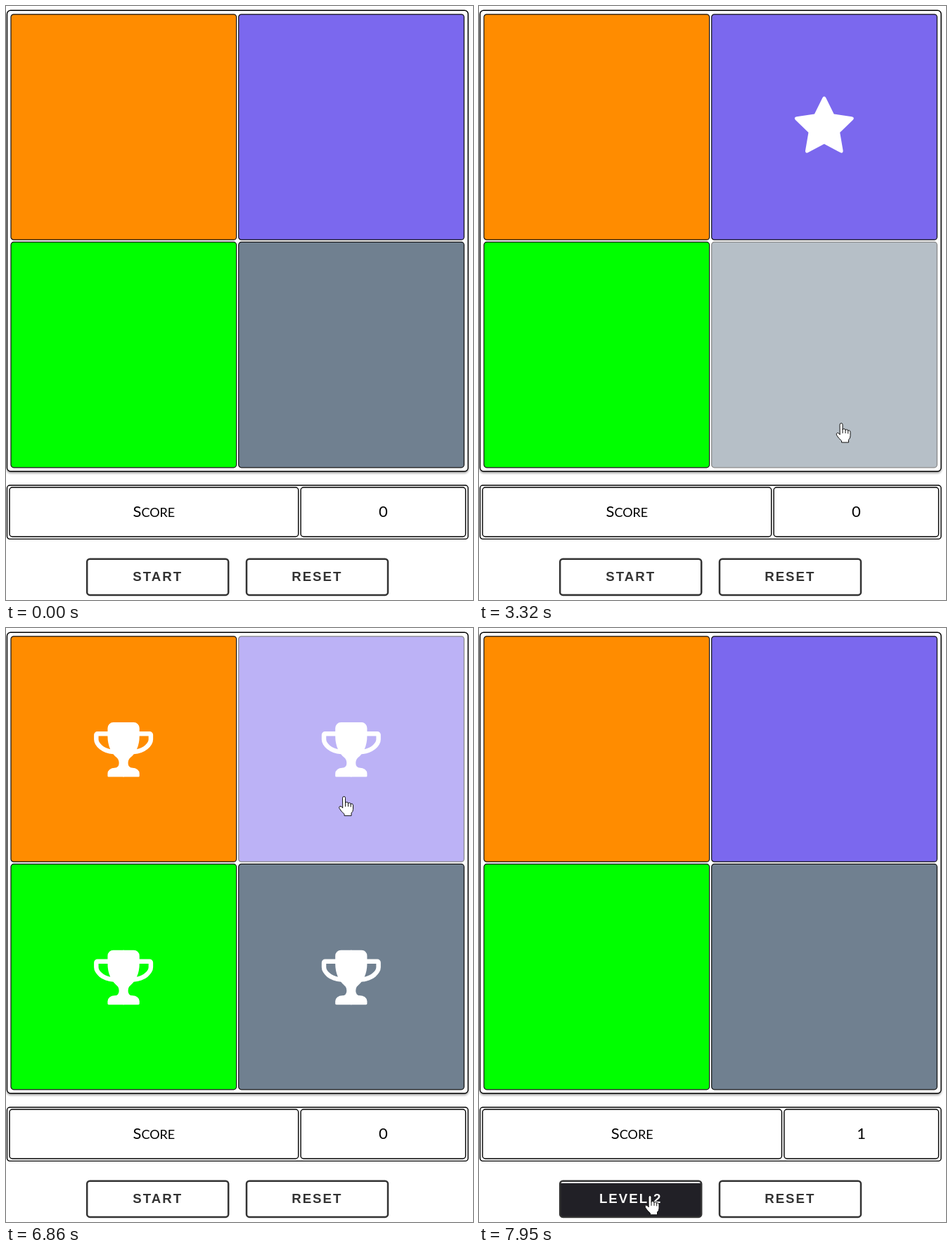
These frames come from a looping animation (664 by 844 pixels, 8 s). An HTML page:

```html
<!DOCTYPE html>
<html lang="en">
<head>
<meta charset="utf-8">
<title>Memory game</title>
<style>
  html, body { margin: 0; width: 100%; height: 100%; overflow: hidden; background: #fff; }
  svg { display: block; width: 664px; height: 844px; }
  text { text-anchor: middle; font-family: Lato, "Open Sans", sans-serif; }
  .frame { fill: #fff; stroke: #000; stroke-width: 1.4; }
  .board { filter: drop-shadow(0 2px 1.5px rgba(0, 0, 0, .35)); }
  .tile rect { stroke: #111; stroke-width: 1.2; }
  .go { font-size: 33px; fill: #fff; }
  .score { font-size: 22px; }
  .small { font-size: 18px; }
  .button { fill: none; stroke: #333; stroke-width: 2.5; }
  .label { font: bold 18.7px "Liberation Sans", Arial, sans-serif; letter-spacing: 2px; fill: #333; }
  .cursor { fill: #fff; stroke: #111; stroke-linejoin: round; stroke-linecap: round; }
</style>
</head>
<body>
<svg viewBox="0 0 664 844">
  <defs>
    <path id="half" fill-rule="evenodd" d="M820-102H1120q66 0 113 47t47 113v96h288q40 0 68 28t28 68v128q0 71-41.5 143t-112 130-173 97.5-215.5 44.5q-42 54-95 95-38 34-52.5 72.5t-14.5 89.5q0 54 30.5 91t97.5 37q75 0 133.5 45.5t58.5 114.5v64q0 14-9 23t-23 9H820zM1536 378v-96h-256q0 209-74 371 141-29 235.5-113t94.5-162z"/>
    <g id="trophy" fill="#fff" transform="translate(125.1 139.2) scale(.0505)">
      <use href="#half"/>
      <use href="#half" transform="translate(1664 0) scale(-1 1)"/>
    </g>
    <path id="star" fill="#fff" transform="translate(125.1 128.5) scale(.0505)" d="M1664 615q0 22-26 48l-363 354 86 500q1 7 1 20 0 21-10.5 35.5t-30.5 14.5q-19 0-40-12l-449-236-449 236q-22 12-40 12-21 0-31.5-14.5t-10.5-35.5q0-6 2-20l86-500-364-354q-25-27-25-48 0-37 56-46l502-73 225-455q19-41 49-41t49 41l225 455 502 73q56 9 56 46z"/>
  </defs>

  <rect class="frame board" x="1.5" y="6.3" width="655.5" height="655" rx="5"/>
  <g id="tiles"></g>

  <rect class="frame" x="1.5" y="681" width="655.5" height="76.4" rx="4"/>
  <rect class="frame" id="nameCell" x="5" y="684" height="70" rx="4"/>
  <rect class="frame" id="valueCell" y="684" height="70" rx="4"/>
  <text class="score" id="name" y="726">S<tspan class="small">CORE</tspan></text>
  <text class="score" id="value" y="726"></text>

  <rect id="fill" x="116" width="199.5" fill="#212026"/>
  <rect class="button" x="115.2" y="785.7" width="201" height="51.2" rx="4"/>
  <rect class="button" x="342" y="785.7" width="201" height="51.2" rx="4"/>
  <text class="label" id="action" x="215.7" y="817"></text>
  <text class="label" x="442.3" y="817">RESET</text>

  <g class="cursor" id="cursor">
    <path id="arrow" stroke="#444" d="M0 0V19.5L4.5 15.5 7.5 22.5 10.5 21 7.7 14.3H14Z"/>
    <g id="hand">
      <path d="M-2 2Q-2 0 0 0T2 2V9Q2 8 4 8T6 10Q6 9 7.8 9T9.7 11Q10 10 11.4 10.3T13 12.5V18Q13 21.5 10.5 23.5V27.3H.5V25Q-3.5 22-6.5 17Q-7.6 14.4-5.6 13.8T-2 16Z"/>
      <path fill="none" d="M2 9V14M6 10V14M9.7 11V14.5"/>
    </g>
  </g>
</svg>
<script>
const LOOP = 8000, STEP = 77.1;
const STAR_ON = 1600, GO_ON = 4600, GO_OFF = 5610, WIN_ON = 6305, WIN_OFF = 7305;
const el = id => document.getElementById(id);

const tiles = ['#ff8c00', '#7b68ee', '#00ff00', '#708090'].map((color, i) => {
  const x = i % 2 * 323.7, y = (i >> 1) * 323.6;
  el('tiles').insertAdjacentHTML('beforeend', `<g class="tile" transform="translate(${x} ${y})">
    <rect x="7" y="11.8" width="320.6" height="320.4" rx="4" fill="${color}"/>
    <text class="go" x="167.5" y="183">GO</text>
    <use class="win" href="#trophy"/>
    ${i === 1 ? '<use class="star" href="#star"/>' : ''}</g>`);
  return { node: el('tiles').lastElementChild, box: [x + 6.4, y + 11.2, x + 328.2, y + 332.8] };
});
const startBox = [114, 784.5, 317.5, 838];

// pointer path: time, x, y
const path = [
  [925, 238, 834], [1311, 239, 818], [1388, 239, 818], [1696, 246, 807], [2853, 246, 807],
  [2930, 247, 805.5], [3545, 598, 527], [5166, 598, 527], [5705, 549, 320], [6014, 491, 186],
  [6091, 487, 174], [6784, 487, 174], [6862, 480.5, 239.5], [7324, 315, 660.5],
  [7633, 265, 774], [7941, 243, 806.5]
];

function slope(i, axis) {
  const a = path[i - 1], b = path[i], c = path[i + 1];
  if (!a || !c || a[axis] === b[axis] || b[axis] === c[axis]) return 0;
  return (c[axis] - a[axis]) / (c[0] - a[0]);
}

function pointerAt(t) {
  const next = path.findIndex(k => k[0] > t);
  if (next < 0) return path[path.length - 1].slice(1);
  if (!next) return path[0].slice(1);
  const i = next - 1, a = path[i], b = path[next], span = b[0] - a[0], u = (t - a[0]) / span;
  return [1, 2].map(axis => {
    const s = u * u * (3 - 2 * u);
    return a[axis] + (b[axis] - a[axis]) * s
      + span * u * (1 - u) * ((1 - u) * slope(i, axis) - u * slope(next, axis));
  });
}

// CSS "ease" curve
function ease(p) {
  if (p <= 0 || p >= 1) return p <= 0 ? 0 : 1;
  let lo = 0, hi = 1, u;
  for (let i = 0; i < 20; i++) {
    u = (lo + hi) / 2;
    if (.75 * u * (1 - u) + u ** 3 < p) lo = u; else hi = u;
  }
  return .3 * u * (1 - u) ** 2 + 3 * u * u * (1 - u) + u ** 3;
}

const inside = ([x, y], [l, t, r, b]) => x >= l && x <= r && y >= t && y <= b;
const show = (node, on) => node.setAttribute('visibility', on ? 'visible' : 'hidden');
const showAll = (selector, on) => document.querySelectorAll(selector).forEach(n => show(n, on));
function set(id, attrs) {
  for (const key in attrs) el(id).setAttribute(key, attrs[key]);
}

function drawScore(won) {
  const split = won ? 430.5 : 415.7, right = split + 3.4;
  set('nameCell', { width: split - 5 });
  set('valueCell', { x: right, width: 653.5 - right });
  set('name', { x: (5 + split) / 2 });
  set('value', { x: (right + 653.5) / 2 });
  el('value').textContent = won ? '1' : '0';
  el('action').textContent = won ? 'LEVEL 2' : 'START';
}

function drawButton(t) {
  const ramp = from => ease((t - from) / 400);
  const p = ramp(895) - ramp(2975) + ramp(7642);
  const shade = Math.round(51 + 204 * p), height = 49.7 * p;
  set('fill', { y: 836.5 - height, height });
  el('action').style.fill = `rgb(${shade},${shade},${shade})`;
}

function draw(time) {
  // the screen refreshes about 13 times a second
  const t = Math.floor((time + 17) / STEP) * STEP;
  const pos = pointerAt(t), visible = t > 900;
  let hand = inside(pos, startBox);
  for (const { node, box } of tiles) {
    const hover = visible && inside(pos, box);
    hand = hand || hover;
    node.setAttribute('opacity', hover ? .5 : 1);
  }
  showAll('.star', t >= STAR_ON && t < GO_ON);
  showAll('.go', t >= GO_ON && t < GO_OFF);
  showAll('.win', t >= WIN_ON && t < WIN_OFF);
  drawScore(t >= WIN_OFF);
  drawButton(t);
  set('cursor', { transform: `translate(${pos[0]} ${pos[1]})` });
  show(el('hand'), visible && hand);
  show(el('arrow'), visible && !hand);
}

const begin = performance.now();
function tick() {
  draw((performance.now() - begin) % LOOP);
  requestAnimationFrame(tick);
}
tick();
</script>
</body>
</html>
```
